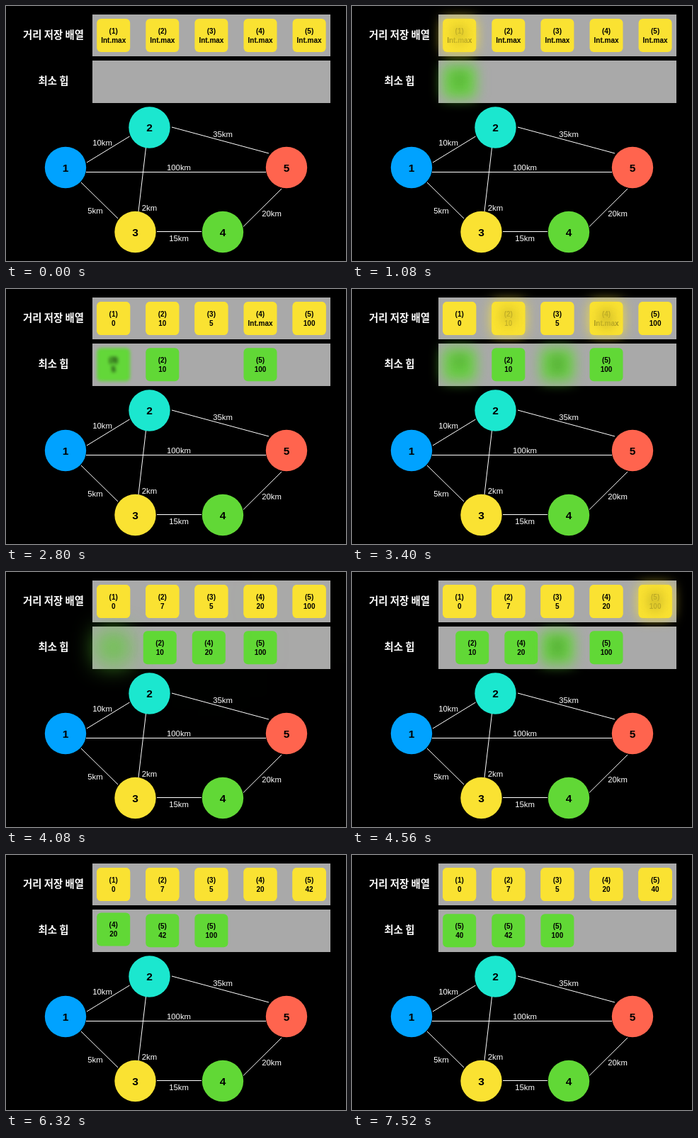
An HTML page with a canvas for the animation above (8 s loop, 480x360 px).

```html
<!DOCTYPE html>
<html lang="ko">
<head>
<meta charset="utf-8">
<style>
  html, body { margin: 0; width: 100%; height: 100%; overflow: hidden; background: #000; }
  canvas { display: block; }
</style>
</head>
<body>
<canvas id="stage" width="480" height="360"></canvas>
<script>
const ctx = document.getElementById('stage').getContext('2d');
const LOOP = 8000, FADE = 690, MOVE = 935;
const SANS = '"Liberation Sans", Arial, sans-serif';
const KOREAN = '"Noto Sans CJK KR", "Noto Sans CJK", sans-serif';
const YELLOW = '#fae232', GREEN = '#61d836';

// Start time of each step of the algorithm
const STEP = [465, 1625, 2785, 3945, 5385, 6825];

// Distance array: slot, value, step at which it appears
const distances = [
  [0, 'Int.max'], [1, 'Int.max'], [2, 'Int.max'], [3, 'Int.max'], [4, 'Int.max'],
  [0, '0', 0],
  [1, '10', 1], [2, '5', 1], [4, '100', 1],
  [1, '7', 2], [3, '20', 2],
  [4, '42', 3],
  [4, '40', 5]
];

// Heap: node, value, first slot, steps of appearing, leaving and shifting left
const heap = [
  { node: 1, value: 0, slot: 0, enter: 0, leave: 1 },
  { node: 3, value: 5, slot: 0, enter: 1, leave: 2 },
  { node: 2, value: 7, slot: 0, enter: 2, leave: 3 },
  { node: 2, value: 10, slot: 1, enter: 1, leave: 4, shifts: [3] },
  { node: 4, value: 20, slot: 2, enter: 2, leave: 5, shifts: [3, 4], lift: 1.7 },
  { node: 5, value: 42, slot: 2, enter: 3, shifts: [4] },
  { node: 5, value: 100, slot: 3, enter: 1, shifts: [4] },
  { node: 5, value: 40, slot: 0, enter: 5 }
];

const nodes = [
  [84, 228, '#00a2ff'], [202.5, 171.5, '#1be7cf'], [182.5, 319, YELLOW],
  [306, 319, GREEN], [396, 228, '#ff644e']
];

// x1, y1, x2, y2, label, label centre
const edges = [
  [114, 221, 174.5, 184, '10km', 136, 193],
  [234, 171, 371, 208, '35km', 306, 181],
  [113, 234.5, 367, 234.5, '100km', 244, 228],
  [106, 249, 158, 300, '5km', 126, 289],
  [197.5, 200, 187, 290, '2km', 202.5, 285],
  [213, 318.5, 276, 318.5, '15km', 244, 328],
  [335, 311.5, 389, 258, '20km', 375, 292.5]
];

const clamp = v => Math.max(0, Math.min(1, v));
const ease = p => (1 - Math.cos(Math.PI * clamp(p))) / 2;
const slotX = slot => 128.2 + slot * 69.1;

function text(str, x, y, font, color) {
  ctx.font = font;
  ctx.fillStyle = color;
  ctx.fillText(str, x, y);
}

// "away" is the time in ms from the fully sharp state
function box(x, y, color, node, value, away) {
  const alpha = 1 - away / 600;
  if (alpha <= 0) return;
  ctx.save();
  if (away > 0) {
    ctx.globalAlpha = alpha;
    ctx.filter = `blur(${(away * 0.122).toFixed(2)}px)`;
  }
  ctx.fillStyle = color;
  ctx.beginPath();
  ctx.roundRect(x, y, 47, 47, 6);
  ctx.fill();
  const font = 'bold 10px ' + SANS;
  text(`(${node})`, x + 23.5, y + 20.7, font, '#000');
  text(value, x + 23.5, y + 33.6, font, '#000');
  ctx.restore();
}

function awayIn(t, step) {
  return step === undefined ? 0 : Math.max(0, STEP[step] + FADE - t);
}

function drawHeapItem(item, t) {
  const { node, value, slot, enter, leave, shifts = [], lift = 0 } = item;
  const awayOut = leave === undefined ? 0 : Math.max(0, t - STEP[leave]);
  const steps = shifts.map(s => ease((t - STEP[s]) / MOVE));
  const shift = steps.reduce((a, b) => a + b, 0);
  const y = 83.2 - lift * (steps[1] || 0);
  box(slotX(slot - shift), y, GREEN, node, value, Math.max(awayIn(t, enter), awayOut));
}

function drawGraph() {
  ctx.strokeStyle = '#fff';
  ctx.lineWidth = 1;
  for (const [x1, y1, x2, y2] of edges) {
    ctx.beginPath();
    ctx.moveTo(x1, y1);
    ctx.lineTo(x2, y2);
    ctx.stroke();
  }
  nodes.forEach(([x, y, color], i) => {
    ctx.fillStyle = color;
    ctx.beginPath();
    ctx.arc(x, y, 29.2, 0, Math.PI * 2);
    ctx.fill();
    text(i + 1, x, y + 5.6, 'bold 15.5px ' + SANS, '#000');
  });
  for (const [, , , , label, x, y] of edges) {
    text(label, x, y + 4, '11.3px ' + SANS, '#fff');
  }
}

function draw(t) {
  ctx.fillStyle = '#000';
  ctx.fillRect(0, 0, 480, 360);
  ctx.fillStyle = '#a9a9a9';
  ctx.fillRect(122, 12, 336, 59);
  ctx.fillRect(122, 77, 336, 60);
  ctx.textAlign = 'center';

  for (const item of heap) drawHeapItem(item, t);
  for (const [slot, value, step] of distances) {
    box(slotX(slot), 18, YELLOW, slot + 1, value, awayIn(t, step));
  }

  text('거리 저장 배열', 67, 45.5, 'bold 14.4px ' + KOREAN, '#fff');
  text('최소 힙', 67, 111, 'bold 14.4px ' + KOREAN, '#fff');
  drawGraph();
}

const start = performance.now();
function tick() {
  draw((performance.now() - start) % LOOP);
  requestAnimationFrame(tick);
}
tick();
</script>
</body>
</html>
```
